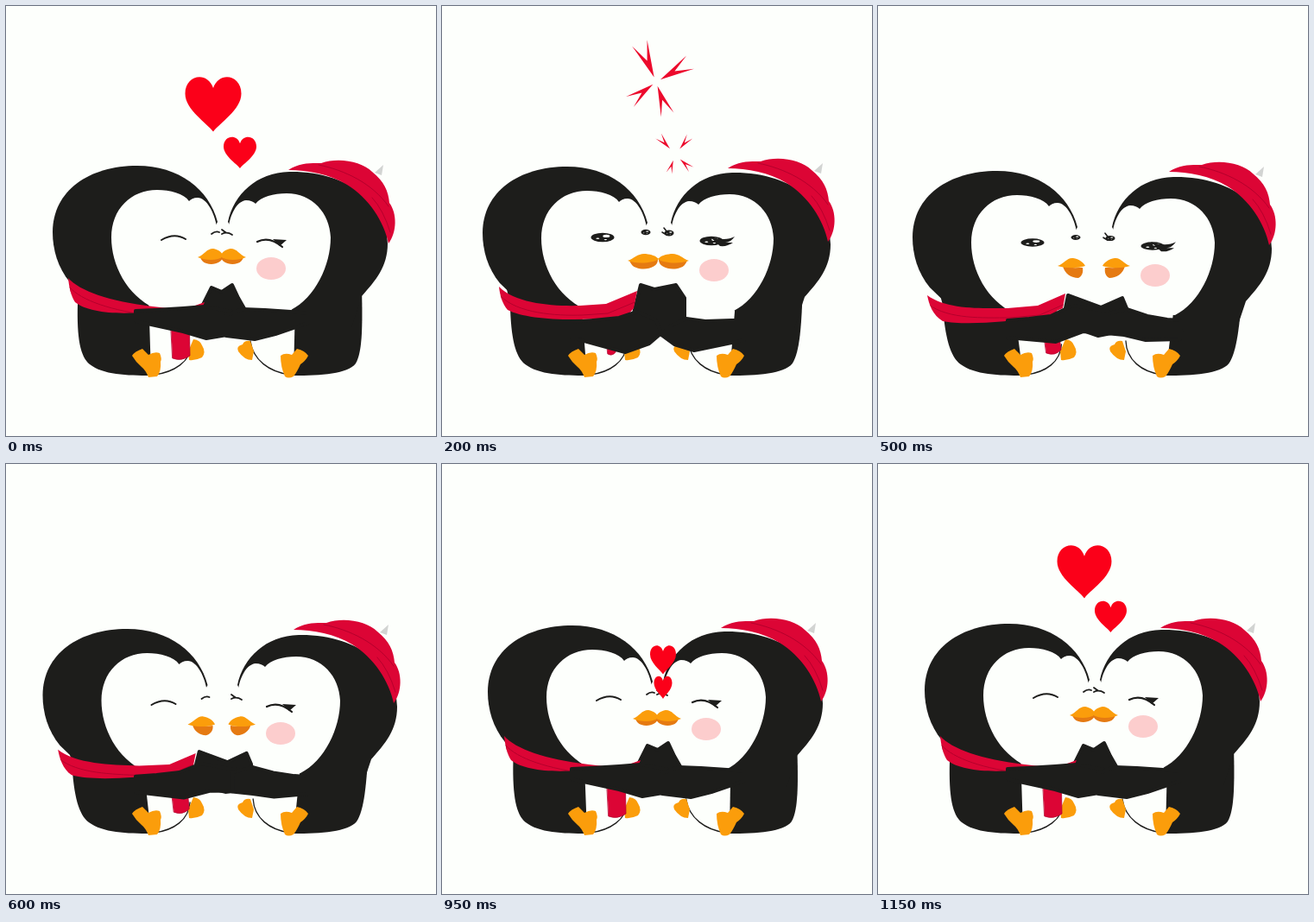
Recreate the animation shown at these times as an HTML page with a canvas. Size 498 px wide and 498 px high, loop 1200 ms.

```html
<!DOCTYPE html>
<html lang="en">
<head>
<meta charset="utf-8">
<title>Penguin kiss</title>
<style>
  html, body { margin: 0; width: 100%; height: 100%; overflow: hidden; background: #fdfffc; }
  canvas { display: block; width: 498px; height: 498px; }
</style>
</head>
<body>
<canvas id="stage" width="498" height="498"></canvas>
<script>
const ctx = document.getElementById('stage').getContext('2d');
const LOOP = 1200, STEP = 50;
const INK = '#1d1d1b', WHITE = '#fdfffc', RED = '#dc0535', DARK = '#b5002c';
const ORANGE = '#fb9d0b', RUST = '#e57a12', PINK = '#fccdcd', HEART = '#fb0019';

// time, left dx, right dx, head dy, feature dy, beak dy, hat dx, hat dy, eye opening
const motion = [
  [0, 0, 0, 0, 0, 0, 0, 0, 0],
  [100, -3, 3, 0, .5, 1, -2, -1, .08],
  [200, -7, 8, 1, 1, 3, -4, -3, .4],
  [250, -12, 13, 1.5, 1.5, 2, -3, -2, .75],
  [300, -17, 17, 2, 2, 1, -1, -1, 1],
  [350, -19, 18, 2, 2, 1, 0, -1, 1],
  [400, -19.5, 18.5, 3, 2, 2, -1, -1, 1],
  [450, -17.5, 17, 5, 2, 4, -2, -2, .7],
  [500, -14, 14, 6, 2, 5, -4, -4, .36],
  [600, -11.5, 11, 6, 2, 5, -5, -4, 0],
  [700, -4.5, 2, 5, 2, 4, -6, -4, 0],
  [750, -2, -1, 4, 2, 3, -5, -4, 0],
  [950, -1, -1, 2, 1, 1, -3, -2, 0],
  [1150, 0, 0, 0, 0, 0, 0, 0, 0],
  [1200, 0, 0, 0, 0, 0, 0, 0, 0]
];

// time, x, y, width, height
const bigHeart = [
  [700, 250, 292, 7, 13], [750, 250, 288, 14, 23], [850, 253, 264, 21, 27],
  [950, 256, 227, 30, 33], [1000, 254, 196, 38, 39], [1050, 249, 164, 48, 48],
  [1100, 243, 138, 57, 56], [1150, 239, 125, 63, 61], [1200, 240, 114, 65, 63],
  [1250, 241, 107, 65, 63]
];
const smallHeart = [
  [850, 252, 281, 10, 15], [950, 256, 259, 21, 26], [1050, 262, 218, 29, 31],
  [1100, 266, 194, 33, 33], [1150, 269.5, 177, 37, 36], [1200, 271, 170, 38, 36],
  [1250, 271, 167, 38, 36]
];

// time, inner radius, outer radius
const bigBurst = {
  x: 248, y: 88, dirs: [[-113, 1], [-30, .93], [143, .78], [71, .82]],
  rows: [[100, 0, 26], [150, 2, 42], [200, 6, 49], [250, 18, 54], [300, 31, 57], [350, 43, 59]]
};
const smallBurst = {
  x: 270, y: 172, dirs: [[-132, 1], [-51, .93], [108, .78], [43, .88]],
  rows: [[100, 0, 15], [150, 4, 24], [200, 9, 29], [250, 20, 33], [300, 30, 35]]
};

// Poses: kiss, parting, open, hug
const poses = [[0, 0], [200, 1], [330, 2], [400, 2], [500, 3], [560, 3], [750, 0], [1200, 0]];
const scarf = [
  'M72,315C85,330 120,342 170,348L205,352L230,343L227,350L200,360L165,354C130,358 95,355 80,343C75,335 73,325 72,315Z',
  'M66,325C85,345 130,348 160,347L190,345L226,330L222,350L208,366L185,362C140,365 95,362 76,352C70,345 67,335 66,325Z',
  'M55,335C75,352 120,352 150,350L185,347L216,330L213,352L200,362L186,365C140,372 95,372 70,362C60,355 57,345 55,335Z',
  'M57,335C80,352 120,350 150,350L185,347L217,333L214,350L200,356L186,360C150,366 100,370 75,365C63,358 59,345 57,335Z'
];
const tail = [
  'M190,350L212,350L213,405Q203,412 193,408Z',
  'M188,350L205,350L201,401Q197,406 192,403Z',
  'M184,348L202,350L209,394Q200,400 191,394Z',
  'M188,350L206,350L212,398Q205,406 195,402Z'
];
const hands = [
  'M226,350L238,326L250,331L262,323L269,338L277,352L268,375L250,372L230,375Z',
  'M221,360L230,323L246,328L271,323L281,338L281,362L268,375L252,378L235,380Z',
  'M214,377L217,336L246,355L279,338L286,333L283,377L262,382L257,390L237,390Z',
  'M214,365L220,335L258,349L283,338L288,350L289,370L270,379L255,382L235,375Z'
];
const leftArm = [
  'M150,353L172,352L205,350L230,348L262,354L262,380L232,385L205,377L150,365Z',
  'M150,366L175,364L205,361L226,354L248,364L254,379L240,391L212,401L150,384Z',
  'M150,373L165,374L186,384L202,396L209,403L207,410L195,416L172,419L148,403Z',
  'M150,364L175,362L200,359L225,347L268,354L270,378L238,377L206,389L150,384Z'
];
const rightArm = [
  'M350,356L330,354L300,352L275,351L255,358L255,382L288,386L312,380L350,367Z',
  'M350,364L335,364L305,365L283,362L264,371L254,381L269,392L292,399L350,387Z',
  'M350,376L335,376L308,375L291,378L280,388L281,393L299,405L325,408L350,399Z',
  'M350,364L335,363L312,359L288,351L264,357L264,379L285,381L310,387L350,386Z'
];
const upperBeak = [
  'M222,291C230,288 232,281 240,281C246,282 250,285 252,290C245,295 232,295 222,291Z',
  'M222,290C230,287 234,281 243,282C250,283 254,284 258,288C252,293 232,294 222,290Z',
  'M222,288C230,285 233,279 240,279C247,281 252,285 254,290C245,292 232,292 222,288Z',
  'M222,288C230,285 233,278 240,279C247,280 252,284 254,288C245,291 232,291 222,288Z'
];
const lowerBeak = [
  'M225,291C235,294 245,293 251,290C251,297 240,301 232,298C228,297 226,294 225,291Z',
  'M224,290C235,293 248,292 257,288C258,298 242,302 232,298C228,297 226,294 224,290Z',
  'M228,289C236,292 245,290 251,291C252,297 249,301 245,303C238,302 230,298 228,289Z',
  'M228,288C236,291 245,290 251,290C252,296 250,300 246,302C238,302 230,297 228,288Z'
];

const lerp = (a, b, k) => a + (b - a) * k;

function at(rows, t) {
  const last = rows.length - 1;
  if (t < rows[0][0] || t > rows[last][0]) return null;
  let i = 0;
  while (i < last - 1 && t >= rows[i + 1][0]) i++;
  const a = rows[i], b = rows[i + 1], k = (t - a[0]) / (b[0] - a[0]);
  return a.slice(1).map((v, n) => lerp(v, b[n + 1], k));
}

function morph(shapes, t) {
  let i = 0;
  while (i < poses.length - 2 && t >= poses[i + 1][0]) i++;
  const [t0, p] = poses[i], [t1, q] = poses[i + 1], k = (t - t0) / (t1 - t0);
  const ends = shapes[q].match(/[\d.]+/g);
  let n = 0;
  return shapes[p].replace(/[\d.]+/g, v => lerp(+v, +ends[n++], k).toFixed(2));
}

function fill(d, color) {
  ctx.fillStyle = color;
  ctx.fill(new Path2D(d));
}

function line(d, color, width) {
  ctx.strokeStyle = color;
  ctx.lineWidth = width;
  ctx.stroke(new Path2D(d));
}

function limb(d) {
  fill(d, INK);
  line(d, INK, 4);
}

function oval(x, y, rx, ry, color) {
  ctx.fillStyle = color;
  ctx.beginPath();
  ctx.ellipse(x, y, rx, ry, 0, 0, Math.PI * 2);
  ctx.fill();
}

function shifted(dx, dy, draw) {
  ctx.save();
  ctx.translate(dx, dy);
  draw();
  ctx.restore();
}

// Leans the drawing while its base stays on the ground
function leaning(dx, draw) {
  const k = dx / 140;
  ctx.save();
  ctx.transform(1, 0, -k, 1, k * 428, 0);
  draw();
  ctx.restore();
}

function bodies(left, right) {
  leaning(left, () => {
    fill('M163,340L218,340L216,395C213,412 195,424 176,426L163,428Z', WHITE);
    line('M216,392C213,412 195,424 172,427', INK, 1.3);
    fill('M78,316L83,345C82,385 86,406 97,415C112,427 140,428 168,428L165,330Z', INK);
  });
  leaning(right, () => {
    fill('M337,345L283,345L283,385C286,410 305,424 325,426L337,428Z', WHITE);
    line('M283,388C286,410 305,424 329,427', INK, 1.3);
    fill('M412,325C413,370 413,400 405,414C396,426 365,428 333,428L335,345Z', INK);
  });
}

function feet() {
  fill('M217,386Q225,387 227,393Q232,401 227,407Q219,411 212,410L211,400Z', ORANGE);
  fill('M283,388Q276,387 274,392Q266,394 269,400Q276,410 285,410L287,400Z', ORANGE);
  fill('M146,405Q149,400 158,397L165,404Q172,400 178,402Q181,409 179,412Q180,423 175,429L165,430Q162,422 157,418Q150,412 146,405Z', ORANGE);
  fill('M318,405Q323,401 331,404L337,397Q346,399 350,405Q347,411 341,415Q337,424 333,429Q327,432 323,429Q318,418 318,405Z', ORANGE);
}

function heads(left, right, dy) {
  shifted(left, dy, () => {
    fill('M74,320C60,303 54,282 54,262C54,214 96,185 152,185C200,185 235,212 245,250L200,335L150,348L100,345Z', INK);
    fill('M212,226C206,217 190,213 175,213C145,213 122,235 122,268C122,300 140,335 172,350L228,345C240,335 247,300 245,262C243,240 232,222 222,222C217,222 214,224 212,226Z', WHITE);
  });
  shifted(right, dy, () => {
    fill('M257,250C264,218 290,193 328,192C400,191 442,232 442,275C442,302 428,318 412,336L400,372L340,372L330,350L300,330Z', INK);
    fill('M289,229C295,221 310,217 325,217C355,217 375,240 376,268C376,300 358,338 330,352L275,350C262,335 255,300 257,262C259,240 268,226 278,225C283,225 287,227 289,229Z', WHITE);
  });
}

function hat() {
  fill('M427,193L437,184L435,196Z', '#d2d4d2');
  fill('M327,190C340,181 355,182 365,182C385,175 412,180 424,192C438,203 443,215 444,228C453,240 453,262 443,275C438,250 420,222 395,207C375,195 350,190 327,190Z', RED);
  line('M362,184C392,190 424,205 443,232', DARK, 1);
  line('M424,222Q437,236 445,262', DARK, 1);
}

function eye(x, y, rx, ry, open) {
  ctx.save();
  ctx.translate(x, y);
  ctx.scale(1, open);
  oval(0, 0, rx, ry, INK);
  oval(rx * .32, -ry * .3, rx * .3, rx * .3, WHITE);
  oval(-rx * .42, ry * .25, rx * .15, rx * .15, WHITE);
  oval(rx * .25, ry * .5, rx * .13, rx * .13, WHITE);
  ctx.restore();
}

function leftEyes(open) {
  if (open < .15) {
    line('M180,271Q195,262 208,270', INK, 2);
    line('M238,264Q243,260 247,262', INK, 1.8);
    return;
  }
  eye(193, 266, 13.5, 13, open);
  eye(243, 260, 5.5, 8, open);
}

function rightEyes(open) {
  if (open < .15) {
    line('M291,273Q305,266 320,279', INK, 2.2);
    fill('M309,270L325,271L317,278Z', INK);
    line('M250,264Q256,261 262,265M254,262L250,259', INK, 1.8);
    return;
  }
  eye(304, 270, 13.5, 13, open);
  eye(255, 261, 5.5, 8.5, open);
  const drop = (1 - open) * 5;
  shifted(0, drop, () => {
    fill('M302,262Q320,268 331,262Q326,269 320,269L329,269Q322,274 314,273Z', INK);
    line('M253,257L249,252M252,260L247,257', INK, 1.6);
  });
}

function beak(t) {
  fill(morph(lowerBeak, t), RUST);
  fill(morph(upperBeak, t), ORANGE);
}

function wrap(t) {
  fill(morph(tail, t), RED);
  line(morph(tail, t), DARK, .8);
  const d = morph(scarf, t);
  fill(d, RED);
  ctx.save();
  ctx.clip(new Path2D(d));
  shifted(2, 11, () => line(d, DARK, 1));
  ctx.restore();
}

function heart(rows, t) {
  const row = at(rows, t < 100 ? t + LOOP : t);
  if (!row) return;
  const [x, y, w, h] = row;
  ctx.save();
  ctx.translate(x, y);
  ctx.scale(w, h);
  fill('M0,.5C-.1,.35 -.5,.1 -.5,-.2C-.5,-.55 -.1,-.62 0,-.3C.1,-.62 .5,-.55 .5,-.2C.5,.1 .1,.35 0,.5Z', HEART);
  ctx.restore();
}

function burst({ x, y, dirs, rows }, t) {
  const row = at(rows, t);
  if (!row) return;
  for (const [deg, size] of dirs) {
    const a = row[0] * size, b = row[1] * size, len = b - a, s = len * .22;
    ctx.save();
    ctx.translate(x, y);
    ctx.rotate(deg * Math.PI / 180);
    fill(`M${a},0L${b},${-s}L${a + len * .48},0L${b},${s}Z`, '#ec0a2c');
    ctx.restore();
  }
}

function draw(t) {
  const [left, right, dy, fy, by, hx, hy, open] = at(motion, t);
  ctx.fillStyle = WHITE;
  ctx.fillRect(0, 0, 498, 498);
  bodies(left, right);
  feet();
  heads(left, right, dy);
  shifted(right + hx, dy + hy, hat);
  shifted(left, dy + fy, () => leftEyes(open));
  shifted(right, dy + fy, () => {
    rightEyes(open);
    oval(307, 304, 17, 13, PINK);
  });
  limb(morph(hands, t));
  shifted(left, dy + fy + by, () => beak(t));
  shifted(right + 500, dy + fy + by, () => {
    ctx.scale(-1, 1);
    beak(t);
  });
  wrap(t);
  limb(morph(leftArm, t));
  limb(morph(rightArm, t));
  heart(bigHeart, t);
  heart(smallHeart, t);
  burst(bigBurst, t);
  burst(smallBurst, t);
}

ctx.lineCap = ctx.lineJoin = 'round';
const start = performance.now();
function tick() {
  const t = (performance.now() - start) % LOOP;
  draw(Math.floor(t / STEP) * STEP);
  requestAnimationFrame(tick);
}
tick();
</script>
</body>
</html>
```
